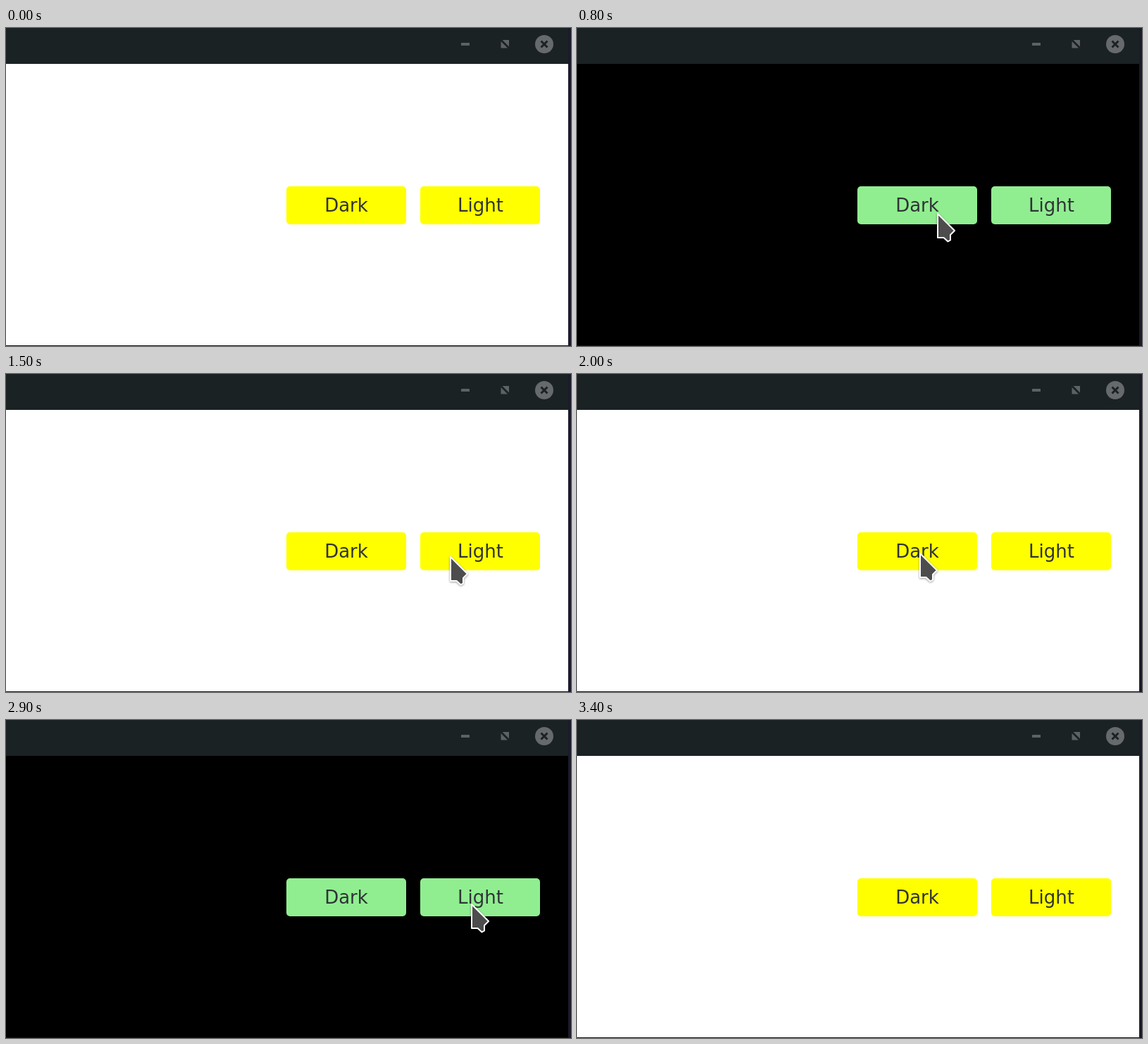
Write an HTML page that moves like this. It is 802 by 452 pixels and loops after 3900 ms.

```html
<!DOCTYPE html>
<html lang="en">
<head>
<meta charset="utf-8">
<title>Theme switch</title>
<style>
  html, body { margin: 0; width: 100%; height: 100%; overflow: hidden; background: #1b2224; }
  svg { display: block; width: 802px; height: 452px; }
  .page, .button, .cursor { animation: 3900ms step-end infinite; }
  .page { animation-name: page; }
  .button { animation-name: button; }
  .cursor { animation-name: move; }
  .label { font: 26px "DejaVu Sans", sans-serif; fill: #303336; text-anchor: middle; }
  .pointer {
    fill: #4d4d4d; stroke: #fff; stroke-width: 2; stroke-linejoin: round;
    filter: drop-shadow(0 1px 1.5px rgba(0, 0, 0, .4));
  }

  @keyframes page {
    0%, 38.461%, 76.923%, 100% { fill: #fff; }
    20.512%, 56.41% { fill: #000; }
  }
  @keyframes button {
    0%, 38.461%, 76.923%, 100% { fill: #ff0; }
    20.512%, 56.41% { fill: #90ee90; }
  }
  /* Each stop is a multiple of 100 ms; the pointer waits below the stage. */
  @keyframes move {
    0%, 87.179%, 100% { transform: translate(640px, 500px); }
    2.564%  { transform: translate(640px, 420px); }
    5.128%  { transform: translate(612px, 328px); }
    7.692%  { transform: translate(575px, 262px); }
    10.256% { transform: translate(540px, 241px); }
    12.82%  { transform: translate(518px, 252px); }
    15.384% { transform: translate(511px, 262px); }
    28.205% { transform: translate(558px, 259px); }
    33.333% { transform: translate(630px, 258px); }
    43.589% { transform: translate(566px, 259px); }
    46.153% { transform: translate(506px, 253px); }
    51.282% { transform: translate(486px, 253px); }
    56.41%  { transform: translate(489px, 252px); }
    58.974% { transform: translate(494px, 253px); }
    64.102% { transform: translate(520px, 257px); }
    66.666% { transform: translate(565px, 261px); }
    69.23%  { transform: translate(615px, 263px); }
    71.794% { transform: translate(650px, 261px); }
    74.358% { transform: translate(660px, 260px); }
    84.615% { transform: translate(624px, 249px); }
  }
</style>
</head>
<body>
<svg viewBox="0 0 802 452">
  <rect width="802" height="452" fill="#1b1b2b"/>
  <rect width="798" height="51" fill="#1b2224"/>
  <rect y="451" width="798" height="1" fill="#171217"/>
  <rect class="page" y="51" width="798" height="400" fill="#fff"/>

  <g fill="#5d6264">
    <rect x="646" y="21" width="12" height="4" rx=".5"/>
    <path d="M702.5 19V28.5H712ZM704.5 17H714V26.5Z"/>
    <circle cx="764" cy="23" r="13" fill="#666a6c"/>
    <path d="M759.5 18.5l9 9m0-9l-9 9" stroke="#1b2224" stroke-width="3"/>
  </g>

  <rect class="button" x="398" y="225" width="170" height="54" rx="5" fill="#ff0"/>
  <rect class="button" x="588" y="225" width="170" height="54" rx="5" fill="#ff0"/>
  <text class="label" x="483" y="261">Dark</text>
  <text class="label" x="673.5" y="261">Light</text>

  <g class="cursor">
    <path class="pointer" d="M1 2V36H9.5L15.5 41.5L19 39.5V32L25 26Z"/>
  </g>
</svg>
</body>
</html>
```
